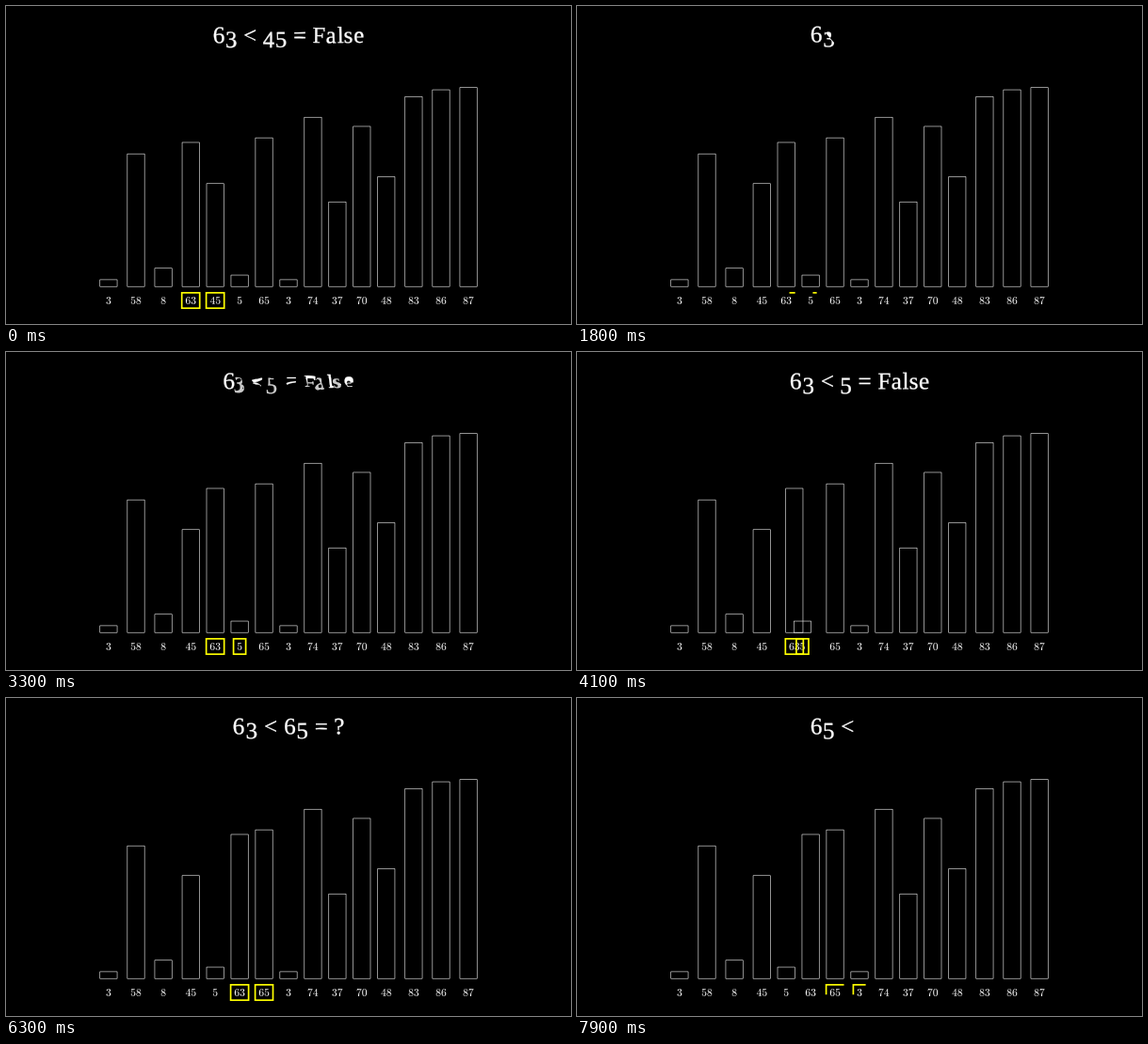
Write a matplotlib script that moves like this. It is 600x338 px and loops after 8000 ms.

```python
import numpy as np
import matplotlib as mpl
import matplotlib.pyplot as plt
from matplotlib.animation import FuncAnimation
from matplotlib.patches import PathPatch
from matplotlib.path import Path
from matplotlib.textpath import TextPath

mpl.rcParams["mathtext.fontset"] = "cm"

W, H, DPI = 600, 338, 100
FRAMES, STEP = 80, 100
PX = 72 / DPI                      # one pixel in points

VALUES = [3, 58, 8, 63, 45, 5, 65, 3, 74, 37, 70, 48, 83, 86, 87]
GAP, WIDE_GAP = 25.95, 29.1
BASE, UNIT, BAR_W = 298.2, 2.432, 18.3
LABEL_Y, LABEL_EM = 313, 11.6
PAD = 4.2

# Title face: wide serif advances (em) with hanging numerals
EM, FACE = 24, 25.2
ADVANCE = {"6": .566, "3": .552, "4": .565, "5": .528, " ": .241,
           "<": .643, "=": .643, "?": .479, "F": .600, "a": .504,
           "l": .286, "s": .432, "e": .484, "T": .618, "r": .410, "u": .576}
HANGING, DROP = "345", 4.9
SAMPLES = 240

# Start time and left slot of each comparison
ROUNDS = [(-1.832, 3), (1.668, 4), (5.168, 5), (7.668, 6)]


def clamp(t):
    return min(max(t, 0), 1)


def smooth(t):
    sig = lambda x: 1 / (1 + np.exp(-x))
    e = sig(-5)
    return clamp((sig(10 * (clamp(t) - .5)) - e) / (1 - 2 * e))


def lerp(a, b, k):
    return a + (b - a) * k


def slot_x(i):
    d = i - 7
    inner = min(abs(d), 4)
    return 300 + np.sign(d) * (inner * GAP + (abs(d) - inner) * WIDE_GAP)


def resample(poly):
    pts = np.asarray(poly)[:-1]
    pts = np.roll(pts, -np.argmax(pts[:, 0]), axis=0)
    pts = np.vstack([pts, pts[:1]])
    run = np.r_[0, np.cumsum(np.hypot(*np.diff(pts, axis=0).T))]
    at = np.linspace(0, run[-1], SAMPLES)
    return np.column_stack([np.interp(at, run, c) for c in pts.T])


def make_glyph(ch):
    path = TextPath((0, 0), ch, size=100, prop={"family": "Liberation Serif"})
    parts = [resample(p) * (FACE / 100, -FACE / 100)
             for p in path.to_polygons() if len(p) > 3]
    xs = np.concatenate(parts)[:, 0]
    shift = (-(xs.min() + xs.max()) / 2, DROP if ch in HANGING else 0)
    return [p + shift for p in parts]


GLYPHS = {ch: make_glyph(ch) for ch in ADVANCE if ch != " "}


def layout(text):
    """Outlines of every visible letter of a centred title line."""
    x = 300 - sum(ADVANCE[c] for c in text) * EM / 2
    y = 39.3 if "l" in text else 38.4
    out = []
    for ch in text:
        w = ADVANCE[ch] * EM
        if ch != " ":
            out.append([p + (x + w / 2, y) for p in GLYPHS[ch]])
        x += w
    return out


def partial(parts, k):
    left = round(k * len(parts) * SAMPLES)
    out = []
    for p in parts:
        if left > 1:
            out.append(p[:left])
        left -= SAMPLES
    return out


def padded(parts, n):
    return parts + [np.repeat(parts[-1][-1:], SAMPLES, axis=0)] * (n - len(parts))


def blend(a, b, k):
    n = max(len(a), len(b))
    return [lerp(p, q, k) for p, q in zip(padded(a, n), padded(b, n))]


fig = plt.figure(figsize=(W / DPI, H / DPI), dpi=DPI, facecolor="black")
ax = fig.add_axes([0, 0, 1, 1])
ax.set(xlim=(0, W), ylim=(H, 0))
ax.axis("off")

label_paths = []
for v in VALUES:
    p = TextPath((0, 0), f"${v}$", size=LABEL_EM)
    box = p.get_extents()
    mid = ((box.x0 + box.x1) / 2, (box.y0 + box.y1) / 2)
    label_paths.append((Path((p.vertices - mid) * (1, -1), p.codes),
                        box.width / 2, box.height / 2))

bars, labels = [], []
for _ in VALUES:
    bar = PathPatch(Path([(0, 0)]), fill=False, ec="white", lw=.58 * PX,
                    joinstyle="miter", snap=False)
    label = PathPatch(Path([(0, 0)]), fc="white", lw=0)
    bars.append(ax.add_patch(bar))
    labels.append(ax.add_patch(label))
extras = []


def rect_points(x, y, hw, hh):
    return np.array([(x + hw, y - hh), (x - hw, y - hh), (x - hw, y + hh),
                     (x + hw, y + hh), (x + hw, y - hh)])


def draw_letter(parts, alpha=1):
    if parts:
        path = Path.make_compound_path(*[Path(p) for p in parts])
        extras.append(ax.add_patch(PathPatch(
            path, fc="white", ec="white", lw=.3 * PX, alpha=alpha)))


def draw_marker(item, x, k, alpha):
    if k <= 0:
        return
    _, hw, hh = label_paths[item]
    pts = rect_points(x, LABEL_Y, hw + PAD, hh + PAD)
    if k > .999:
        path = Path(pts, closed=True)
    else:
        n = int(4 * k)
        path = Path(np.vstack([pts[:n + 1], lerp(pts[n], pts[n + 1], 4 * k - n)]))
    extras.append(ax.add_patch(PathPatch(
        path, fill=False, ec="#ffff00", lw=1.7 * PX, alpha=alpha,
        joinstyle="miter", capstyle="butt", snap=False)))


def draw_title(head, verdict, age, alpha):
    asked = layout(f"{head} = ?")
    if age < 1:
        for i, parts in enumerate(asked):
            draw_letter(partial(parts, smooth(age / .5 * len(asked) - i)), alpha)
        return
    answer = layout(f"{head} = {verdict}")
    k = smooth(age - 1)
    last = -1
    for i, parts in enumerate(answer):
        j = i * len(asked) // len(answer)
        draw_letter(blend(asked[j], parts, k), alpha * (k if j == last else 1))
        last = j


def draw(frame):
    t = frame * STEP / 1000
    while extras:
        extras.pop().remove()
    order = list(range(len(VALUES)))
    xs = [slot_x(i) for i in order]

    for start, i in ROUNDS:
        age = t - start
        if age < 0:
            break
        a, b = order[i], order[i + 1]
        less = VALUES[a] < VALUES[b]
        end = 2 if less else 3
        if not less:
            k = smooth(age - 2)
            xs[a] = lerp(slot_x(i), slot_x(i + 1), k)
            xs[b] = lerp(slot_x(i + 1), slot_x(i), k)
            order[i], order[i + 1] = b, a
        if age < end + .5:
            alpha = 1 - smooth((age - end) / .5)
            for item in (a, b):
                draw_marker(item, xs[item], smooth(age / .5), alpha)
            draw_title(f"{VALUES[a]} < {VALUES[b]}", str(less), age, alpha)

    for v, x, bar, label, (path, _, _) in zip(VALUES, xs, bars, labels, label_paths):
        hh = v * UNIT / 2
        bar.set_path(Path(rect_points(x, BASE - hh, BAR_W / 2, hh), closed=True))
        label.set_path(Path(path.vertices + (x, LABEL_Y), path.codes))
    return bars + labels + extras


anim = FuncAnimation(fig, draw, frames=FRAMES, interval=STEP,
                     init_func=lambda: draw(0), repeat=True, repeat_delay=0)
plt.show()
```
